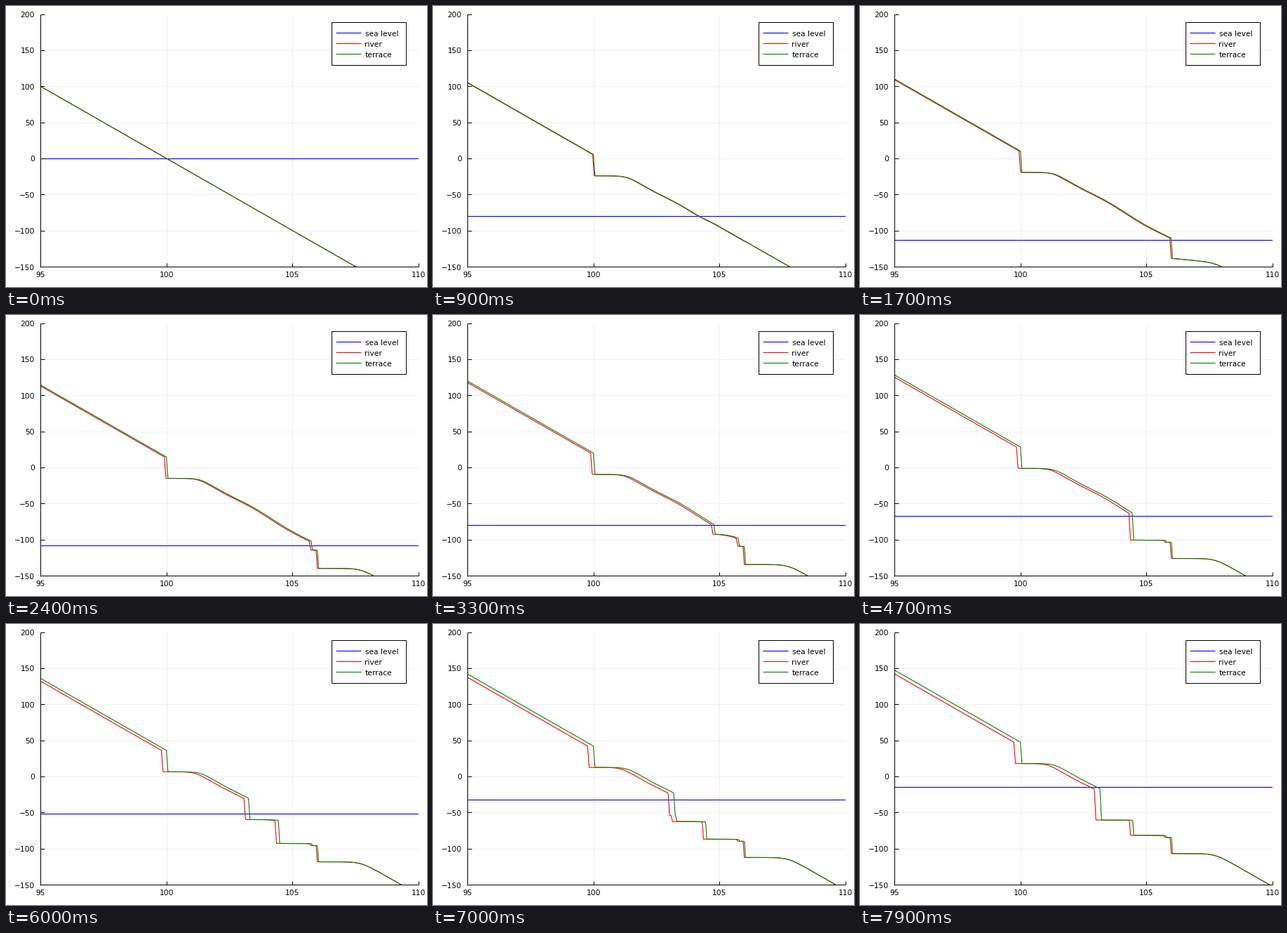
A matplotlib script for the animation above (8000 ms loop, 600x400 px).

```python
import numpy as np
import matplotlib.pyplot as plt
from matplotlib.animation import FuncAnimation
from matplotlib.patches import Rectangle

W, H, DPI = 600, 400, 100
FRAMES, STEP = 80, 100
LEFT, RIGHT, TOP, BOTTOM = 49, 588.2, 11.5, 371.1
PX = 72 / DPI
FONT = 10.67 * PX
BLUE, RED, GREEN = "#0000ff", "#ff0000", "#008000"

SLOPE, UPLIFT, RETREAT = 20, 0.6, 0.0033
COAST, LOWSTAND = 100, 17
SEA_T = (0, 9, 17, 24, 33, 47, 60, 79)
SEA_H = (0, -80, -113, -108, -79.5, -67, -52, -14.5)

# Wave-cut terraces: start, end, cliff position, landward travel, floor
TERRACES = [
    (12, 18, 105.97, 0, -154.3),
    (17, 24, 105.73, 0, -128.7),
    (24, 33, 104.77, 0.9, -112.3),
    (33, 46, 104.43, 0.35, -128.9),
    (48, 59, 103.25, 1.2, -95.8),
    (60, 74, 103.15, 0.1, -107.7),
]

x = np.linspace(95, 110, 1501)


def sea_at(t):
    return np.interp(t, SEA_T, SEA_H)


def carve(h, u, edge, floor, amount, k=4):
    """Cut a platform seaward of edge that blends into the slope."""
    platform = -k * np.logaddexp(-floor / k, -h / k)
    cliff = np.clip((u - edge) / 0.06, 0, 1)
    return h + (platform - h) * cliff * amount


def land(u, t):
    """Initial slope, washed by the falling sea, with the first platform."""
    low = min(t, LOWSTAND)
    shore = COAST - (sea_at(low) - UPLIFT * low) / SLOPE
    start = min(t / 2, 1)
    wash = 2.2 + 1.2 * np.cos(2 * np.pi * (u - 102.1) / 2.8)
    wash = wash * np.clip((shore + 0.5 - u) / 0.8, 0, 1) * start
    h = -SLOPE * (u - COAST) - np.where(u > COAST, wash, 0)
    return carve(h, u, COAST, -29.5, start)


def profile(t, retreat):
    """Ground at time t; with retreat, cliffs move upstream until drowned."""
    h = land(x + np.where(x < 106, retreat * t, 0), t)
    for start, end, edge, travel, floor in TERRACES:
        a = np.clip((t - start) / (end - start), 0, 1)
        shift = retreat * min(t, (start + end) / 2)
        h = carve(h, x + shift, edge + travel * (1 - a), floor, a)
    return h + UPLIFT * t


plt.rcParams["font.family"] = "DejaVu Sans"
fig = plt.figure(figsize=(W / DPI, H / DPI), dpi=DPI, facecolor="white")

ax = fig.add_axes([LEFT / W, 1 - BOTTOM / H, (RIGHT - LEFT) / W, (BOTTOM - TOP) / H])
ax.set(xlim=(95, 110), ylim=(-150, 200))
ax.axis("off")

# Overlay in pixel coordinates, y downwards
page = fig.add_axes([0, 0, 1, 1], facecolor="none")
page.set(xlim=(0, W), ylim=(H, 0))
page.axis("off")


def rule(xs, ys, color="black", width=1.0):
    page.plot(xs, ys, color=color, lw=width * PX, solid_capstyle="butt", snap=True)


def label(px, py, s, ha):
    page.text(px, py, s, fontsize=FONT, ha=ha, va="center_baseline")


for v in range(95, 111, 5):
    px = LEFT + (v - 95) / 15 * (RIGHT - LEFT)
    ax.axvline(v, color="#f0f0f0", lw=PX, zorder=0)
    rule([px, px], [BOTTOM, BOTTOM - 5.5])
    label(px, 382.3, str(v), "center")
for v in range(-150, 201, 50):
    py = BOTTOM - (v + 150) / 350 * (BOTTOM - TOP)
    ax.axhline(v, color="#f0f0f0", lw=PX, zorder=0)
    rule([LEFT, LEFT + 5.5], [py, py])
    label(41, py + 0.4, str(v).replace("-", "\u2212"), "right")
rule([LEFT, LEFT], [TOP, BOTTOM + 0.5])
rule([LEFT - 0.5, RIGHT], [BOTTOM, BOTTOM])

page.add_patch(Rectangle((464, 23), 106, 61, fc="white", ec="black", lw=PX))
for i, (name, color) in enumerate([("sea level", BLUE), ("river", RED), ("terrace", GREEN)]):
    y = 38.4 + 15 * i
    rule([470, 506], [y, y], color, 1.1)
    label(511.5, y + 0.4, name, "left")

sea, river, terrace = [ax.plot([], [], color=c, lw=1.1 * PX)[0] for c in (BLUE, RED, GREEN)]


def update(t):
    sea.set_data([95, 110], [sea_at(t)] * 2)
    river.set_data(x, profile(t, RETREAT))
    terrace.set_data(x, profile(t, 0))
    return sea, river, terrace


anim = FuncAnimation(fig, update, frames=FRAMES, interval=STEP, repeat=True,
                     repeat_delay=0, init_func=lambda: update(0))
plt.show()
```
